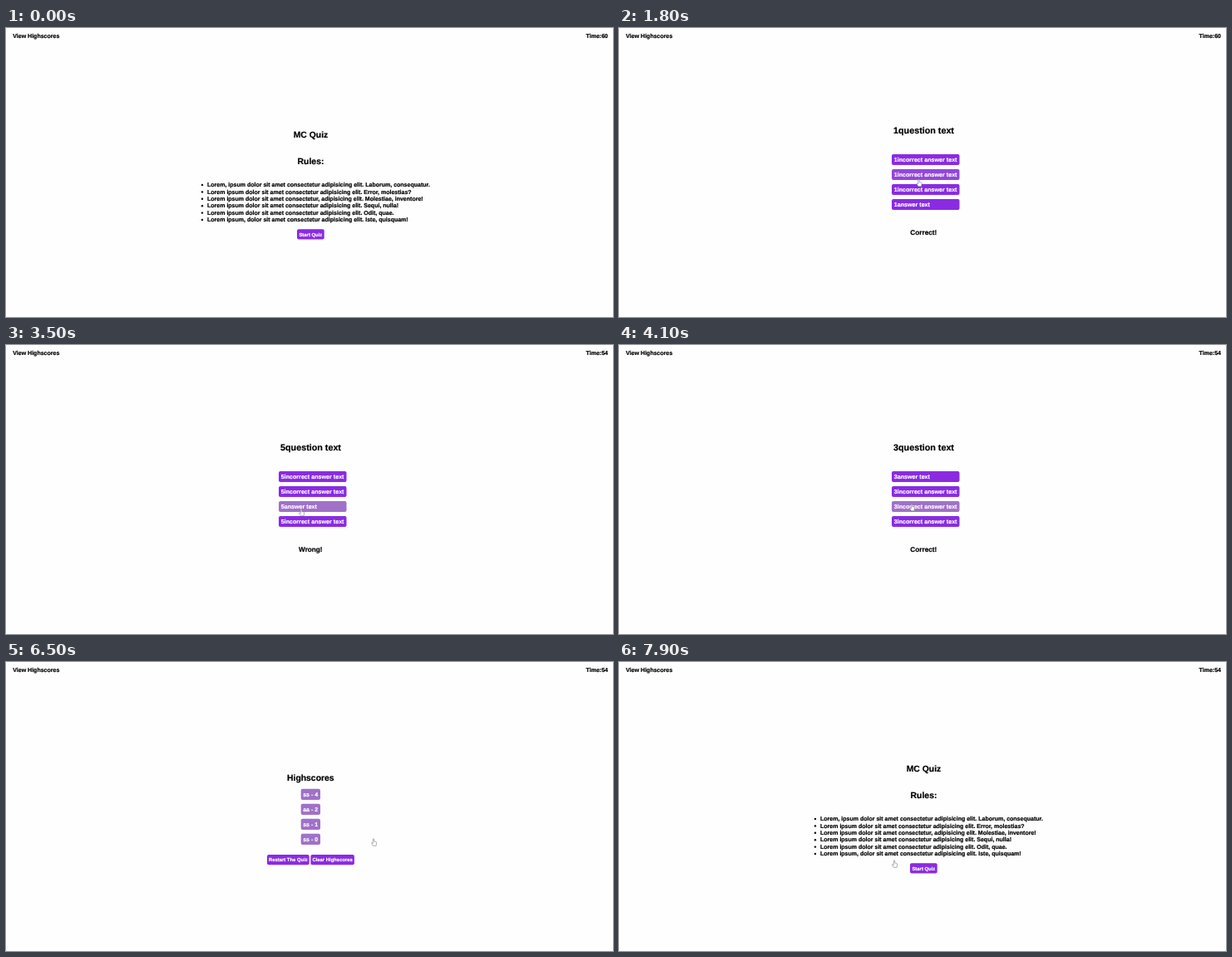
Recreate the animation shown at these times as an HTML page. Size 730 px wide and 348 px high, loop 8000 ms.

```html
<!DOCTYPE html>
<html lang="en">
<head>
<meta charset="utf-8">
<title>Quiz</title>
<style>
  html, body { margin: 0; width: 100%; height: 100%; overflow: hidden; background: #fefefe; }
  svg { display: block; width: 100%; height: 100%; }
  text {
    font: bold 7.03px "Liberation Sans", Arial, sans-serif;
    text-rendering: geometricPrecision;
    fill: #000;
    stroke: #000;
    stroke-width: .2px;
  }
  .title { font-size: 10.4px; }
  .question { font-size: 10.75px; }
  .verdict { font-size: 8.2px; }
  .answer { font-size: 7.15px; }
  .small { font-size: 5.9px; }
  .answer, .score, .small { fill: #fff; stroke: #fff; }
  .typed { font-size: 5.85px; font-weight: normal; stroke: none; }
  .mid { text-anchor: middle; }
  .end { text-anchor: end; }
  .screen { display: none; }
  .screen.on { display: inline; }
</style>
</head>
<body>
<svg id="stage" viewBox="0 0 730 348"></svg>
<script>
const LOOP = 8000, FADE = 300, GRACE = 110;
const BASE = [138, 43, 226], HOVER = [160, 113, 200];
const stage = document.getElementById('stage');
const buttons = [];

function add(parent, tag, attrs, content) {
  const el = document.createElementNS('http://www.w3.org/2000/svg', tag);
  for (const key in attrs) el.setAttribute(key, attrs[key]);
  if (content) el.textContent = content;
  return parent.appendChild(el);
}
const label = (parent, x, y, cls, content) => add(parent, 'text', { x, y, class: cls }, content);
const rgb = c => `rgb(${c.map(Math.round)})`;

function button(screen, x, y, width, height) {
  const el = add(screen.group, 'rect', { x, y, width, height, rx: 2, fill: rgb(BASE) });
  buttons.push({ el, screen, x, y, width, height });
}
function smallButton(screen, x, y, width, content) {
  button(screen, x, y, width, 12.2);
  label(screen.group, x + width / 2, y + 8.2, 'small mid', content);
}

function rules(screen) {
  const g = screen.group;
  label(g, 366.5, 132.3, 'title mid', 'MC Quiz');
  label(g, 366.5, 164.3, 'title mid', 'Rules:');
  [
    'Lorem, ipsum dolor sit amet consectetur adipisicing elit. Laborum, consequatur.',
    'Lorem ipsum dolor sit amet consectetur adipisicing elit. Error, molestias?',
    'Lorem ipsum dolor sit amet consectetur, adipisicing elit. Molestiae, inventore!',
    'Lorem ipsum dolor sit amet consectetur adipisicing elit. Sequi, nulla!',
    'Lorem ipsum dolor sit amet consectetur adipisicing elit. Odit, quae.',
    'Lorem ipsum, dolor sit amet consectetur adipisicing elit. Iste, quisquam!'
  ].forEach((line, i) => {
    const y = 191.2 + i * 8.4;
    add(g, 'circle', { cx: 236, cy: y - 2.2, r: 1.2 });
    label(g, 242, y, '', line);
  });
  smallButton(screen, 350, 242.3, 32.7, 'Start Quiz');
}

const quiz = (number, answerRow, verdict) => screen => {
  const g = screen.group;
  label(g, 366.5, 127.2, 'question mid', number + 'question text');
  for (let row = 0; row < 4; row++) {
    const y = 152 + row * 18;
    button(screen, 328, y, 81.5, 13);
    label(g, 330.7, y + 9.1, 'answer', number + (row === answerRow ? 'answer text' : 'incorrect answer text'));
  }
  label(g, 366.3, 248.8, 'verdict mid', verdict);
};

let typed;
function done(screen) {
  const g = screen.group;
  label(g, 366.5, 169.8, 'title mid', 'All Done!');
  label(g, 366.5, 196.4, 'mid', 'You scored 4 out of 5!');
  label(g, 285.7, 213.5, '', 'Enter your initials:');
  add(g, 'rect', { x: 348.5, y: 206.8, width: 72.5, height: 9.2, rx: 1, fill: '#fff', stroke: '#767676', 'stroke-width': .8 });
  typed = label(g, 350.3, 213.5, 'typed', '');
  smallButton(screen, 422.8, 205.3, 24.7, 'Submit');
}

function highscores(screen) {
  const g = screen.group;
  label(g, 366.3, 142.8, 'title mid', 'Highscores');
  ['ss - 4', 'aa - 2', 'ss - 1', 'ss - 0'].forEach((entry, i) => {
    const y = 152.7 + i * 18;
    add(g, 'rect', { x: 354.7, y, width: 23.3, height: 13.2, rx: 2, fill: rgb(HOVER) });
    label(g, 357.2, y + 9.2, 'score', entry);
  });
  smallButton(screen, 314, 232, 50.7, 'Restart The Quiz');
  smallButton(screen, 366.4, 232, 52.5, 'Clear Highscores');
}

const screens = [
  [0, rules],
  [1000, quiz(2, 1, '')],
  [1800, quiz(1, 3, 'Correct!')],
  [2600, quiz(4, 3, 'Correct!')],
  [3200, quiz(5, 2, 'Wrong!')],
  [3900, quiz(3, 0, 'Correct!')],
  [4800, done],
  [6200, highscores],
  [7800, rules]
].map(([start, build]) => {
  const screen = { start, group: add(stage, 'g', { class: 'screen' }) };
  build(screen);
  return screen;
});

label(stage, 8.3, 12.2, '', 'View Highscores');
const clock = label(stage, 724, 12.2, 'end', '');

const hand = add(stage, 'path', {
  d: 'M-.7 .7Q0-.4 .7 .7V3.5L3 4Q3.9 4.3 3.7 5.4L3.1 8.8H-.6L-2.5 5.7Q-2.4 4.7-1.5 5.2L-.7 5.9Z',
  fill: '#fff', stroke: '#707070', 'stroke-width': .55, 'stroke-linejoin': 'round'
});

// Pointer tip stops: time, x, y
const path = [
  [50, 408, 305], [850, 368, 248], [1000, 367, 247],
  [1600, 360.5, 182], [1900, 360.5, 182], [2450, 353, 210], [2600, 352, 208],
  [2850, 351, 194.5], [3000, 351, 193], [3200, 351, 193],
  [3500, 355, 197], [3800, 352, 191], [4100, 352, 191],
  [4500, 350, 159], [4800, 350, 159], [5080, 392, 211],
  [5700, 392, 211], [6000, 442, 212.5], [6700, 442, 212.5],
  [7550, 338, 238], [7750, 338, 238], [7900, 331, 238.5], [8000, 329, 239]
];

function tipAt(t) {
  const i = path.findIndex(stop => stop[0] > t);
  if (i < 1) return path[i < 0 ? path.length - 1 : 0].slice(1);
  const [t0, x0, y0] = path[i - 1], [t1, x1, y1] = path[i];
  const u = (t - t0) / (t1 - t0), k = u * u * (3 - 2 * u);
  return [x0 + (x1 - x0) * k, y0 + (y1 - y0) * k];
}

// Share of the recent past that the tip spent over the button
function hoverAmount(b, t) {
  const steps = 15;
  let hits = 0;
  for (let i = 0; i < steps; i++) {
    const past = t - i * FADE / steps;
    if (past < Math.max(50, b.screen.start - GRACE)) break;
    const [x, y] = tipAt(past);
    if (x >= b.x && x <= b.x + b.width && y >= b.y && y <= b.y + b.height) hits++;
  }
  return hits / steps;
}

function draw(t) {
  const current = screens.filter(s => s.start <= t).pop();
  screens.forEach(s => s.group.classList.toggle('on', s === current));
  for (const b of buttons) {
    if (b.screen !== current) continue;
    const k = hoverAmount(b, t);
    b.el.setAttribute('fill', rgb(BASE.map((c, i) => c + (HOVER[i] - c) * k)));
  }
  clock.textContent = 'Time:' + (t < 2100 ? 60 : t < 3200 ? 59 : 54);
  typed.textContent = 's'.repeat((t >= 5400) + (t >= 5600));
  const hidden = t < 100 || (t >= 5080 && t < 5800);
  hand.setAttribute('visibility', hidden ? 'hidden' : 'visible');
  hand.setAttribute('transform', `translate(${tipAt(t)})`);
}

let began;
function tick(now) {
  began ??= now;
  draw((now - began) % LOOP);
  requestAnimationFrame(tick);
}
draw(0);
requestAnimationFrame(tick);
</script>
</body>
</html>
```
